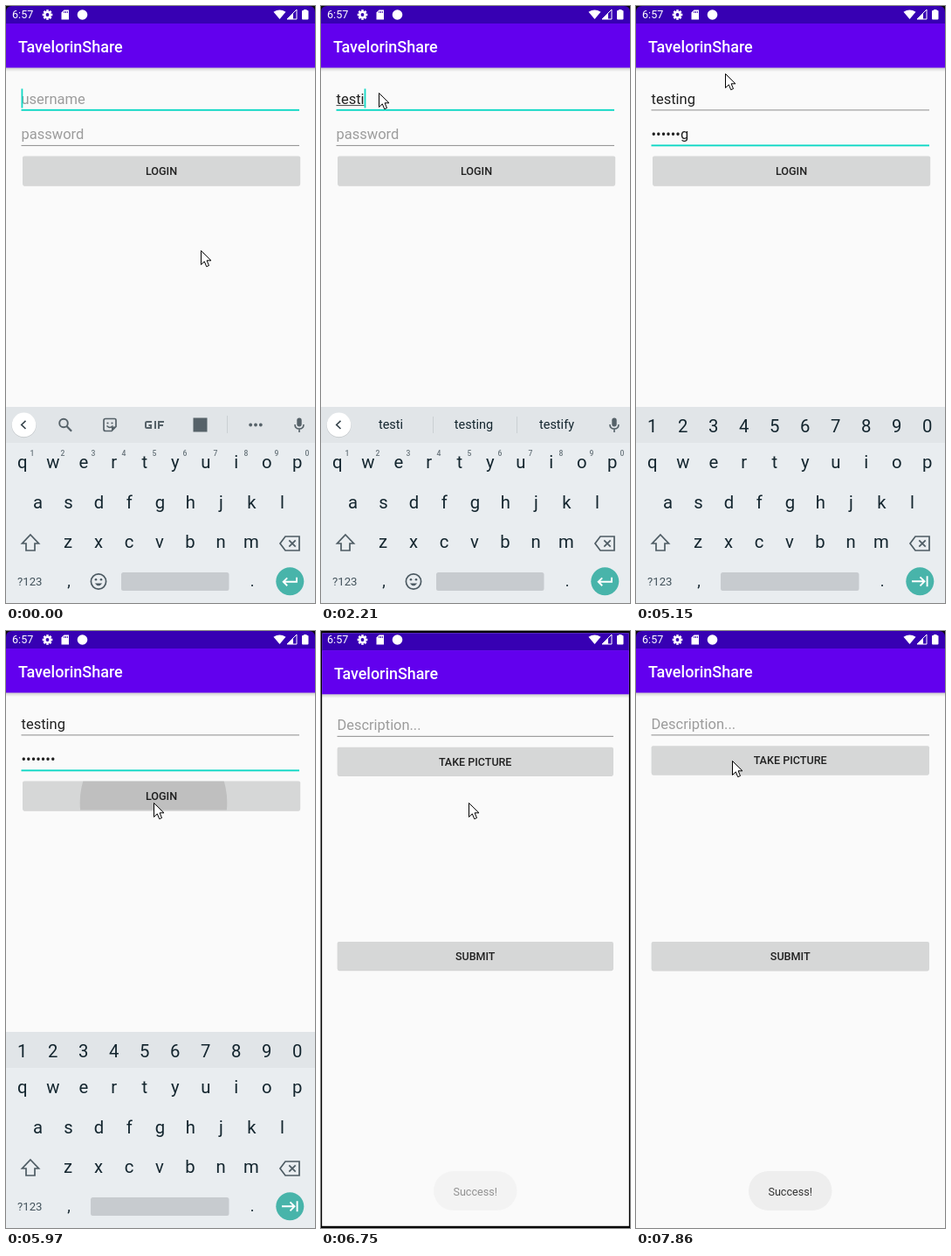
Write an HTML page with a canvas that moves like this. It is 354 by 682 pixels and loops after 8000 ms.

```html
<!DOCTYPE html>
<html lang="en">
<head>
<meta charset="utf-8">
<title>Login demo</title>
<style>
html, body { margin: 0; width: 100%; height: 100%; overflow: hidden; background: #fafafa; }
canvas { display: block; width: 354px; height: 682px; }
</style>
</head>
<body>
<canvas id="stage"></canvas>
<script>
const W = 354, H = 682, LOOP = 8000;
const canvas = document.getElementById('stage');
const c = canvas.getContext('2d');
const dpr = window.devicePixelRatio || 1;
canvas.width = W * dpr;
canvas.height = H * dpr;

const INK = '#212121', HINT = '#9c9c9c', TEAL = '#10d8c5', KEY = '#14262f', ICON = '#566269';
const FIELD = 16.5, LEFT = 17.5, RIGHT = 336;
const WORD = 'testing';
const USER_TIMES = [1400, 1670, 1840, 1990, 2100, 2220, 2330];
const PASS_TIMES = [3510, 3640, 3820, 4030, 4130, 4230, 4330];
const MASK_END = 5830, OPEN = 6542, OPEN_MS = 400;
const HINTS = [
  [1490, 't the to'], [1700, 'te test tell'], [1840, 'tes test tell'], [1990, 'test tests testing'],
  [2100, 'testi testing testify'], [2220, 'testin testing tested'], [2330, 'testing testing tested']
];
// time, x, y of the pointer tip
const POINTER = [
  [0, 223, 279], [30, 223, 279], [330, 142, 180], [690, 66, 99], [5119, 66, 99],
  [5150, 101, 78], [5230, 148, 22], [5290, 174, 9], [5390, 197, 66], [5510, 184, 165],
  [5630, 169, 196], [6950, 169, 196], [7130, 150, 148], [7250, 134, 118], [7350, 120, 112],
  [7500, 108, 126], [7720, 110, 148], [8000, 110, 148]
];

const clamp = v => Math.max(0, Math.min(1, v));
const ramp = (t, from, ms) => clamp((t - from) / ms);
const cubic = (s, p) => {
  const r = 1 - s;
  return r * r * r * p[0] + 3 * r * r * s * p[1] + 3 * r * s * s * p[2] + s * s * s * p[3];
};

function solve(x, xs, ys) {
  let lo = 0, hi = 1;
  for (let i = 0; i < 24; i++) {
    const mid = (lo + hi) / 2;
    if (cubic(mid, xs) < x) lo = mid; else hi = mid;
  }
  return cubic(lo, ys);
}

function windowEase(p) {
  return p < 1 / 6
    ? solve(p, [0, 0.05, 0.1333, 0.1667], [0, 0, 0.06, 0.4])
    : solve(p, [0.1667, 0.2083, 0.25, 1], [0.4, 0.82, 1, 1]);
}

function font(size, weight = 400) {
  c.font = `${weight} ${size}px Roboto, sans-serif`;
}

function text(str, x, y, size, color, align = 'left', weight = 400) {
  font(size, weight);
  c.fillStyle = color;
  c.textAlign = align;
  c.fillText(str, x, y);
}

function rect(x, y, w, h, color) {
  c.fillStyle = color;
  c.fillRect(x, y, w, h);
}

function round(x, y, w, h, r, color) {
  c.beginPath();
  c.roundRect(x, y, w, h, r);
  c.fillStyle = color;
  c.fill();
}

function disc(x, y, r, color) {
  c.beginPath();
  c.arc(x, y, r, 0, Math.PI * 2);
  c.fillStyle = color;
  c.fill();
}

function ring(x, y, r, color, width) {
  c.beginPath();
  c.arc(x, y, r, 0, Math.PI * 2);
  c.strokeStyle = color;
  c.lineWidth = width;
  c.stroke();
}

// Path data placed at x, y
function path(x, y, d, stroke, width, fill) {
  c.save();
  c.translate(x, y);
  const p = new Path2D(d);
  if (fill) { c.fillStyle = fill; c.fill(p); }
  if (stroke) { c.strokeStyle = stroke; c.lineWidth = width; c.stroke(p); }
  c.restore();
}

function zoomed(scale, draw) {
  c.save();
  c.translate(W / 2, H / 2);
  c.scale(scale, scale);
  c.translate(-W / 2, -H / 2);
  draw();
  c.restore();
}

function frame() {
  rect(0, 0, W, H, '#fafafa');
  const shade = c.createLinearGradient(0, 70, 0, 75);
  shade.addColorStop(0, 'rgba(0,0,0,.2)');
  shade.addColorStop(1, 'rgba(0,0,0,0)');
  rect(0, 70, W, 5, shade);
  rect(0, 0, W, 20.5, '#3700b3');
  rect(0, 20, W, 50.5, '#6200ee');
  text('TavelorinShare', 14, 52.8, 18, '#fff', 'left', 500);
}

function statusIcons() {
  const white = '#fff';
  text('6:57', 7, 14.3, 12.6, white);
  for (let i = 0; i < 8; i++) {
    c.save();
    c.translate(47.5, 10);
    c.rotate(i * Math.PI / 4);
    rect(-1.3, -5.8, 2.6, 3, white);
    c.restore();
  }
  ring(47.5, 10, 3.1, white, 2.4);
  path(63.5, 4.5, 'M3 0H8.5V11H0V3Z', null, 0, white);
  for (let i = 0; i < 3; i++) rect(66.3 + i * 1.8, 6, 0.9, 2, '#3700b3');
  disc(87.5, 10, 5.8, white);
  path(313.5, 15, 'M0 0L-7 -8.2Q0 -13 7 -8.2Z', null, 0, white);
  path(322, 15, 'M0 0L11 -11V0Z', white, 1);
  path(322, 15, 'M0 0L7 -7V0Z', null, 0, white);
  rect(341, 4, 3.5, 2, white);
  round(339, 5, 7.5, 10.5, 1, white);
}

function button(label, x, y, w, h) {
  round(x, y + 0.8, w, h, 2, 'rgba(0,0,0,.16)');
  round(x - 0.4, y, w + 0.8, h, 2, '#d6d7d7');
  text(label, 178 - (label === 'LOGIN' ? 0 : 1.3), y + h / 2 + 4.7, 12.6, INK, 'center', 500);
}

function underline(y, focused) {
  if (focused) rect(LEFT, y - 1, RIGHT - LEFT, 1.9, TEAL);
  else rect(LEFT, y - 0.5, RIGHT - LEFT, 1, '#8d8d8d');
}

function field(value, hint, baseline, focused, caretOn, composing) {
  text(value || hint, LEFT, baseline, FIELD, value ? INK : HINT);
  const end = LEFT + (value ? c.measureText(value).width : 0);
  underline(baseline + 7.4, focused);
  if (composing && value) rect(LEFT, baseline + 1.6, end - LEFT, 1, '#444');
  if (caretOn) rect(end, baseline - 17, 1.8, 22, TEAL);
}

function userCaret(t) {
  return t < 90 || (t >= 590 && t < 1090) || (t >= 1400 && t < 2820);
}

function passCaret(t) {
  return (t >= 2820 && t < 3350) || (t >= 3510 && t < 4840) || (t >= 5340 && t < 5840) || t >= 6300;
}

function ripple(t) {
  if (t < 5920 || t > 6270) return;
  const grow = 1 - (1 - ramp(t, 5920, 225)) ** 2;
  c.save();
  c.beginPath();
  c.roundRect(19, 171.5, 318, 33, 2);
  c.clip();
  c.globalAlpha = 0.13 * ramp(t, 5920, 60) * (1 - ramp(t, 6110, 160));
  disc(169, 196, 20 + 160 * grow, '#000');
  c.restore();
}

const typed = (times, t) => times.filter(s => t >= s).length;

function loginPage(t) {
  frame();
  const inPass = t >= 2820;
  const n = typed(PASS_TIMES, t);
  const shown = n && t < MASK_END ? WORD[n - 1] : '';
  const secret = '•'.repeat(n - shown.length) + shown;
  field(WORD.slice(0, typed(USER_TIMES, t)), 'username', 111.5, !inPass, userCaret(t), !inPass);
  field(secret, 'password', 152, inPass, passCaret(t), false);
  button('LOGIN', 19.4, 171.5, 317.4, 33.5);
  ripple(t);
  keyboard(t);
}

function postPage() {
  frame();
  field('', 'Description...', 111.5, false, false, false);
  button('TAKE PICTURE', 18, 131.3, 317.6, 32.7);
  button('SUBMIT', 18, 355, 317.6, 32.7);
}

function toolbar() {
  ring(66, 476.5, 4.8, ICON, 1.9);
  path(69.5, 480, 'M0 0L5.6 5.8', ICON, 2.2);
  path(112, 471.5, 'M2 0H12.5Q14 0 14 2V9L9 14H2Q0 14 0 12V2Q0 0 2 0Z', ICON, 1.7);
  path(121, 485.5, 'M0 0V-5H5Z', null, 0, ICON);
  disc(116.5, 476.5, 1.1, ICON);
  disc(121.5, 476.5, 1.1, ICON);
  path(115.5, 479.5, 'M0 0Q3.5 4 7 0', ICON, 1.4);
  path(159, 474, 'M8 1H2.5Q1 1 1 2.5V6.5Q1 8 2.5 8H7V5H4.5M12 0V9M16 9V1H22M16 5H21', ICON, 2);
  rect(214.5, 470.5, 16, 16, ICON);
  rect(253, 468, 1, 20, '#cbd0d3');
  for (let i = -1; i < 2; i++) disc(286 + i * 5.8, 478.5, 1.9, ICON);
}

function suggestions(words) {
  words.split(' ').forEach((w, i) => text(w, 80 + i * 95, 483, 14.5, KEY, 'center'));
  for (const x of [128, 224]) rect(x, 469, 1, 19, '#cbd0d3');
}

function keyRow(letters, x, baseline) {
  [...letters].forEach((k, i) => text(k, x + i * 35, baseline, 20.3, KEY, 'center'));
}

function keyboard(t) {
  const numeric = t >= 2850;
  rect(0, 458, W, 224, '#e9edf0');
  rect(0, 458, W, 41, '#e1e5e8');
  if (numeric) {
    keyRow('1234567890', 18.7, 486.7);
  } else {
    disc(20.5, 479.2, 14, 'rgba(0,0,0,.13)');
    disc(20.5, 478.4, 13.8, '#fff');
    path(18.5, 478.4, 'M4 -4.6L-0.8 0L4 4.6', '#37454d', 1.6);
    const current = HINTS.filter(h => t >= h[0]).pop();
    if (current) suggestions(current[1]); else toolbar();
    round(333.3, 470.5, 5.4, 10, 2.7, ICON);
    path(336, 478, 'M-5 0Q-5 5 0 5T5 0M0 5V9', ICON, 1.6);
    [...'1234567890'].forEach((d, i) => text(d, 30 + i * 35, 514, 8.6, '#69757c', 'center', 500));
  }
  keyRow('qwertyuiop', 18.8, 528);
  keyRow('asdfghjkl', 36.4, 573.5);
  keyRow('zxcvbnm', 71, 618.8);
  path(28, 613, 'M0 -9L9.5 1H5V9H-5V1H-9.5Z', '#4d5b63', 1.7);
  path(325, 614, 'M-5 -8H11V8H-5L-11 0Z', '#4d5b63', 1.7);
  path(328, 614, 'M-3.7 -3.7L3.7 3.7M3.7 -3.7L-3.7 3.7', '#4d5b63', 1.7);
  text('?123', 13, 662, 13.2, '#42525b');
  text(',', 72, 663, 18, KEY, 'center');
  text('.', 282, 663, 18, KEY, 'center');
  const bar = numeric ? 97 : 132;
  round(bar, 647, 255.5 - bar, 21, 2.5, '#c7cbcf');
  disc(325.3, 657.3, 16, '#48b4aa');
  if (numeric) {
    path(325, 657.3, 'M-9 0H5M0.5 -5L5.5 0L0.5 5M8.6 -6V6', '#fff', 1.9);
  } else {
    ring(106, 657.5, 8.6, '#4d5b63', 1.7);
    disc(103, 655.3, 1.3, '#4d5b63');
    disc(109, 655.3, 1.3, '#4d5b63');
    path(101.8, 659.4, 'M0 0Q4.2 5.6 8.4 0Z', null, 0, '#4d5b63');
    path(325, 657.8, 'M8 -5V0H-7M-2.8 -4.4L-7.3 0L-2.8 4.4', '#fff', 1.9);
  }
}

function toast(t) {
  c.globalAlpha = ramp(t, 6650, 200);
  round(129, 617, 95.5, 45, 22.5, '#eeeeee');
  text('Success!', 176.7, 644.6, 12.6, '#323232', 'center');
  c.globalAlpha = 1;
}

function slope(i, axis) {
  const a = POINTER[i - 1], b = POINTER[i], d = POINTER[i + 1];
  if (!a || !d) return 0;
  const still = (p, q) => p[1] === q[1] && p[2] === q[2];
  if (still(a, b) || still(b, d)) return 0;
  return (d[axis] - a[axis]) / (d[0] - a[0]);
}

function pointerAt(t, axis) {
  const i = Math.max(1, POINTER.findIndex(p => p[0] > t)) - 1;
  const a = POINTER[i], b = POINTER[i + 1], dt = b[0] - a[0];
  const third = dt / 3;
  return cubic((t - a[0]) / dt, [
    a[axis], a[axis] + slope(i, axis) * third, b[axis] - slope(i + 1, axis) * third, b[axis]
  ]);
}

function pointer(t) {
  const x = Math.round(pointerAt(t, 1)) + 0.5, y = Math.round(pointerAt(t, 2)) + 0.5;
  path(x, y, 'M0 0V16L3.8 12.4L6.2 18.2L9 17L6.6 11.3H11.5Z', '#000', 1, '#fff');
}

function corners() {
  path(0, 0, 'M0 0H7Q0 0 0 7Z', null, 0, '#0a0a0a');
  path(W, 0, 'M0 0H-7Q0 0 0 7Z', null, 0, '#0a0a0a');
}

function draw(t) {
  c.setTransform(dpr, 0, 0, dpr, 0, 0);
  rect(0, 0, W, H, '#000');
  const p = windowEase(ramp(t, OPEN, OPEN_MS));
  const cover = ramp(t, OPEN + 35, 50);
  if (t < OPEN) loginPage(t);
  else {
    if (cover < 1) zoomed(1 + 0.15 * p, () => loginPage(t));
    c.globalAlpha = cover;
    if (cover > 0) zoomed(p > 0.9995 ? 1 : 0.85 + 0.15 * p, postPage);
    c.globalAlpha = 1;
  }
  statusIcons();
  toast(t);
  corners();
  pointer(t);
}

const start = performance.now();
function tick() {
  draw((performance.now() - start) % LOOP);
  requestAnimationFrame(tick);
}
tick();
</script>
</body>
</html>
```
